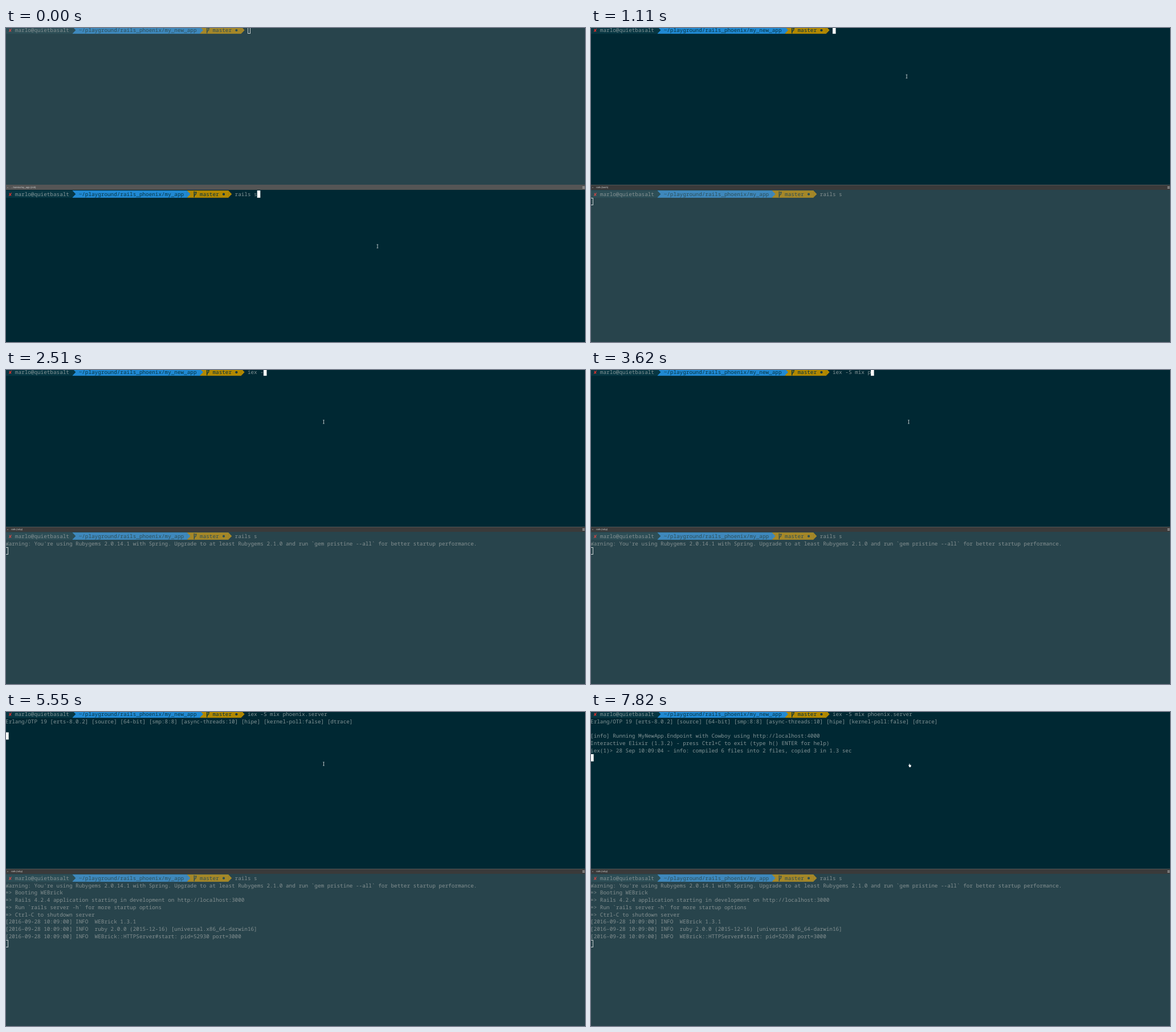
An HTML page with a canvas that plays this animation: 1016x551 px, repeating every 8 s.

```html
<!DOCTYPE html>
<html lang="en">
<head>
<meta charset="utf-8">
<title>Split terminal</title>
<style>
  html, body { margin: 0; width: 100%; height: 100%; overflow: hidden; background: #002833; }
  canvas { display: block; width: 1016px; height: 551px; }
</style>
</head>
<body>
<canvas id="stage" width="1016" height="551"></canvas>
<script>
const ctx = document.getElementById('stage').getContext('2d');
const W = 1016, H = 551, LOOP = 8000;
const CELL = 5.59, ROW = 12.75, LEFT = -0.9, BASE = 9.7;
const FONT = '9.32px "Noto Sans Mono", "DejaVu Sans Mono", monospace';
const COLOR = {
  bg: '#002833', host: '#073642', blue: '#2089d3', gold: '#b28800',
  text: '#839496', red: '#dc322f', cursor: '#fafafa'
};
const USER = 'marlo@quietbasalt';
const COMMAND = 'iex -S mix phoenix.server';

// Each track lists [start time, value]; values hold until the next entry.
const typed = [
  [0, 0], [1980, 1], [2160, 3], [2340, 4], [2510, 5], [2660, 6],
  [2990, 7], [3140, 8], [3290, 10], [3450, 11], [3610, 12], [3770, 14], [3920, 16],
  [4060, 18], [4210, 19], [4480, 20], [4630, 21], [4790, 22], [4950, 23], [5250, 25]
];
const labels = [
  [0, '...hoenix/my_app (zsh)'], [300, 'rails'], [1110, 'rails (bash)'], [1320, 'rails (ruby)']
];
const pointer = [
  [0, [652, 383]], [810, [545, 53]], [1110, [554, 85]], [1320, [557.5, 91]]
];
const topLog = [
  [5550, 'Erlang/OTP 19 [erts-8.0.2] [source] [64-bit] [smp:8:8] [async-threads:10] [hipe] [kernel-poll:false] [dtrace]'],
  [5550, ''],
  [6300, '[info] Running MyNewApp.Endpoint with Cowboy using http://localhost:4000'],
  [6300, 'Interactive Elixir (1.3.2) - press Ctrl+C to exit (type h() ENTER for help)'],
  [6300, 'iex(1)> '],
];
const railsLog = [
  [2160, "Warning: You're using Rubygems 2.0.14.1 with Spring. Upgrade to at least Rubygems 2.1.0 and run `gem pristine --all` for better startup performance."],
  [4210, '=> Booting WEBrick'],
  [4210, '=> Rails 4.2.4 application starting in development on http://localhost:3000'],
  [4210, '=> Run `rails server -h` for more startup options'],
  [4210, '=> Ctrl-C to shutdown server'],
  [4790, '[2016-09-28 10:09:00] INFO  WEBrick 1.3.1'],
  [4790, '[2016-09-28 10:09:00] INFO  ruby 2.0.0 (2015-12-16) [universal.x86_64-darwin16]'],
  [4790, '[2016-09-28 10:09:00] INFO  WEBrick::HTTPServer#start: pid=52930 port=3000']
];

const at = (track, t) => track.filter(([start]) => start <= t).pop()[1];
const colX = col => LEFT + col * CELL;

function rect(x, y, w, h, color) {
  ctx.fillStyle = color;
  ctx.fillRect(x, y, w, h);
}

function line(color, width, ...pts) {
  ctx.strokeStyle = color;
  ctx.lineWidth = width;
  ctx.beginPath();
  pts.forEach(([x, y]) => ctx.lineTo(x, y));
  ctx.stroke();
}

// Terminal text sits on a fixed character grid.
function write(str, col, y, color = COLOR.text) {
  ctx.font = FONT;
  ctx.fillStyle = color;
  [...str].forEach((ch, i) => {
    if (ch !== ' ') ctx.fillText(ch, colX(col + i), y + BASE);
  });
}

function segment(from, to, y, color) {
  const x = colX(to);
  rect(colX(from), y, x - colX(from), ROW, color);
  ctx.beginPath();
  ctx.moveTo(x - 0.3, y);
  ctx.lineTo(x + CELL + 0.3, y + ROW / 2);
  ctx.lineTo(x - 0.3, y + ROW);
  ctx.fill();
}

function branch(col, y) {
  const x = colX(col);
  line(COLOR.host, 1.5, [x + 1.4, y + 1.5], [x + 1.4, y + 12]);
  line(COLOR.host, 1.2, [x + 1.4, y + 9], [x + 4.4, y + 6.4], [x + 4.4, y + 2.5]);
  line(COLOR.host, 1, [x + 2.9, y + 4.2], [x + 4.4, y + 2.3], [x + 5.6, y + 4.2]);
}

// Draws the prompt and returns the column where the command begins.
function prompt(path, y) {
  const end = 24 + path.length;
  segment(end, end + 13, y, COLOR.gold);
  segment(21, end, y, COLOR.blue);
  rect(colX(end) + CELL / 2, y, 0, ROW, COLOR.blue);
  segment(0, 21, y, COLOR.host);
  write('✘', 1, y, COLOR.red);
  write(USER, 3, y);
  write(path, 23, y, COLOR.host);
  branch(end + 2, y);
  write('master', end + 4, y, COLOR.host);
  ctx.fillStyle = COLOR.host;
  ctx.beginPath();
  ctx.arc(colX(end + 11) + CELL / 2, y + 6.6, 2.1, 0, Math.PI * 2);
  ctx.fill();
  return end + 15;
}

function pane({ top, height, origin, path, command, lines, cursor, active }) {
  ctx.save();
  ctx.beginPath();
  ctx.rect(0, top, W, height);
  ctx.clip();
  rect(0, top, W, height, COLOR.bg);
  const start = prompt(path, origin);
  write(command, start, origin);
  lines.forEach((str, i) => write(str, 0, origin + (i + 1) * ROW));

  const [row, col] = cursor || [0, start + command.length];
  const x = colX(col), y = origin + row * ROW;
  if (active) {
    rect(x, y, CELL, ROW, COLOR.cursor);
  } else {
    rect(0, top, W, height, 'rgba(133,133,133,0.3)');
    ctx.strokeStyle = '#c9d0d1';
    ctx.lineWidth = 1;
    ctx.strokeRect(Math.round(x) + 0.5, Math.round(y) + 0.5, 4, 12);
  }
  ctx.restore();
}

function titleBar(label, active) {
  rect(0, 275, W, 9, active ? '#555555' : '#3a3a3a');
  if (!active) rect(0, 275, W, 0.8, '#565a5b');
  line('#858585', 0.6, [2, 279], [4, 281]);
  line('#858585', 0.6, [4, 279], [2, 281]);
  ctx.font = '4.3px "Liberation Sans", sans-serif';
  ctx.fillStyle = '#d8d8d8';
  ctx.fillText(label, 9, 281.4);
  for (let i = 0; i < 3; i++) rect(1011.5, 278 + i * 1.5, 4, 0.8, '#b8b8b8');
}

function beam([x, y]) {
  const color = '#c4cdcf';
  line(color, 0.9, [x, y - 3], [x, y + 3]);
  line(color, 0.8, [x - 1.5, y - 3], [x + 1.2, y - 3]);
  line(color, 0.8, [x - 1.5, y + 3], [x + 1.2, y + 3]);
}

function hand(x, y) {
  rect(x - 1, y - 3, 1.1, 4, '#ffffff');
  ctx.beginPath();
  ctx.moveTo(x - 2.2, y - 0.8);
  ctx.lineTo(x + 2.3, y - 1);
  ctx.lineTo(x + 2.2, y + 1.4);
  ctx.lineTo(x + 1.4, y + 3);
  ctx.lineTo(x - 0.8, y + 3);
  ctx.fill();
}

function topCursor(t) {
  if (t < 5250) return null;
  if (t < 5550) return [1, 0];
  if (t < 6300) return [3, 0];
  return t < 7820 ? [5, 8] : [6, 0];
}

function draw(t) {
  const topActive = t >= 1110;
  const shown = log => log.filter(([start]) => start <= t).map(([, str]) => str);
  const topLines = shown(topLog), railsLines = shown(railsLog);
  if (t >= 7820) topLines[4] += '28 Sep 10:09:04 - info: compiled 6 files into 2 files, copied 3 in 1.3 sec';

  pane({
    top: 0, height: 275, origin: -2.6, path: '~/playground/rails_phoenix/my_new_app',
    command: COMMAND.slice(0, at(typed, t)), lines: topLines,
    cursor: topCursor(t), active: topActive
  });
  pane({
    top: 284, height: H - 284, origin: 285.1, path: '~/playground/rails_phoenix/my_app',
    command: 'rails s', lines: railsLines,
    cursor: t < 300 ? null : [railsLines.length + 1, 0], active: !topActive
  });
  titleBar(at(labels, t), !topActive);
  if (t < 6780) beam(at(pointer, t));
  else hand(559.3, 93.8);
}

ctx.textRendering = 'geometricPrecision';
const began = performance.now();
function frame() {
  draw((performance.now() - began) % LOOP);
  requestAnimationFrame(frame);
}
frame();
</script>
</body>
</html>
```
